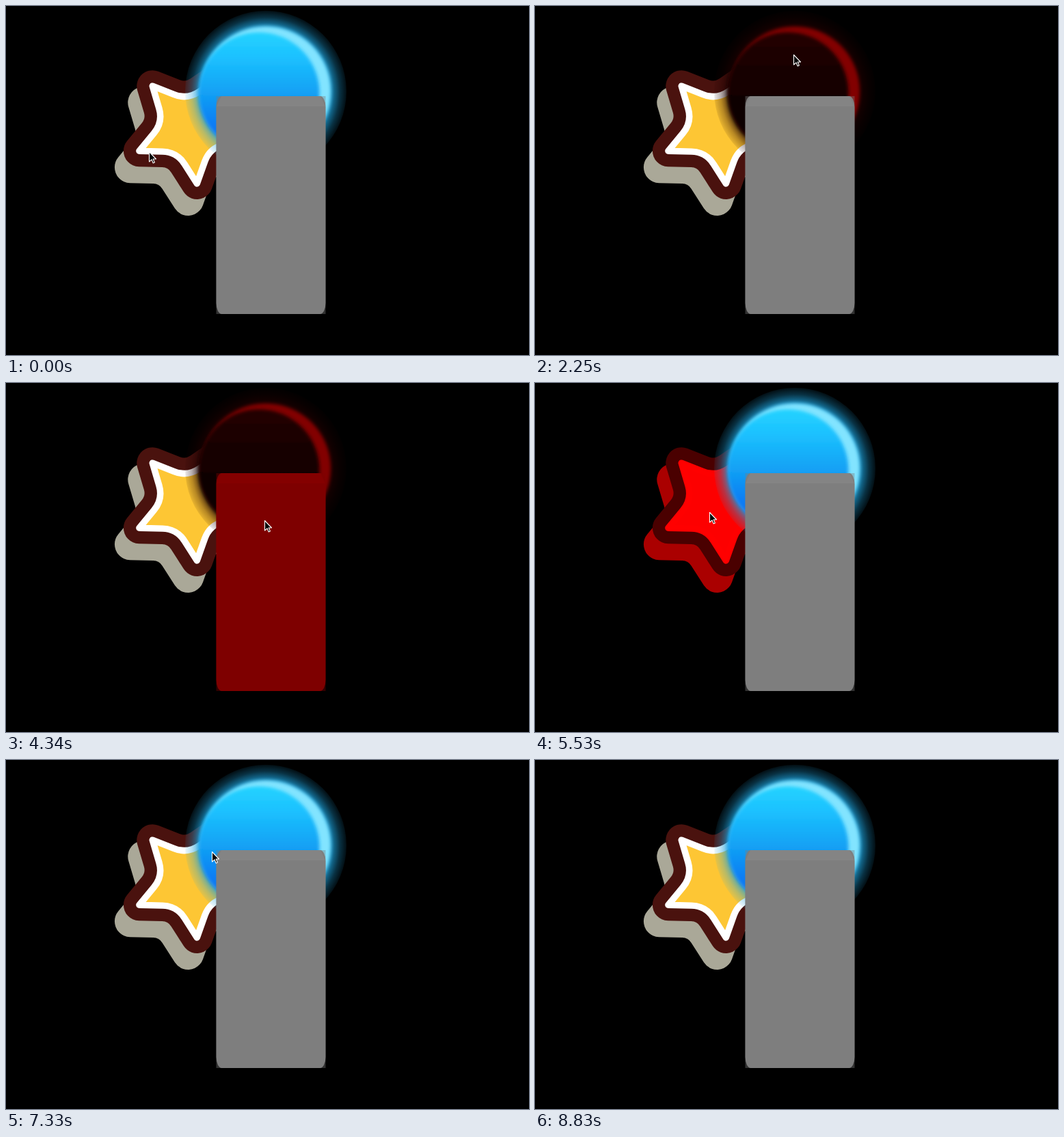
These frames come from a looping animation (765x511 px, 9550 ms). An HTML page:

```html
<!DOCTYPE html>
<html lang="en">
<head>
<meta charset="utf-8">
<title>Click hit test</title>
<style>
  html, body { margin: 0; width: 100%; height: 100%; overflow: hidden; background: #000; }
  svg { display: block; width: 100%; height: 100%; }
</style>
</head>
<body>
<svg viewBox="0 0 765 511">
  <defs>
    <!-- Multiplies a shape by pure red -->
    <filter id="redTint" x="-30%" y="-30%" width="160%" height="160%" color-interpolation-filters="sRGB">
      <feColorMatrix values="1 0 0 0 0  0 0 0 0 0  0 0 0 0 0  0 0 0 1 0"/>
    </filter>
    <filter id="soft"><feGaussianBlur stdDeviation="2.4"/></filter>
    <radialGradient id="glow">
      <stop offset=".78" stop-color="#1c9fd8"/>
      <stop offset=".85" stop-color="#1c9fd8" stop-opacity=".62"/>
      <stop offset=".92" stop-color="#1c9fd8" stop-opacity=".31"/>
      <stop offset="1" stop-color="#1c9fd8" stop-opacity=".09"/>
    </radialGradient>
    <linearGradient id="sky" x1="0" y1="36" x2="0" y2="220" gradientUnits="userSpaceOnUse">
      <stop offset="0" stop-color="#26d4ff"/>
      <stop offset=".2" stop-color="#1cc2ff"/>
      <stop offset=".5" stop-color="#12a0f4"/>
      <stop offset=".75" stop-color="#0a7cf4"/>
      <stop offset="1" stop-color="#0864e8"/>
    </linearGradient>
    <path id="starShape" stroke-linejoin="round"/>
  </defs>
  <rect width="765" height="511"/>

  <g id="star">
    <use href="#starShape" x="-13" y="24" fill="#aaa898" stroke="#aaa898" stroke-width="46"/>
    <use href="#starShape" fill="#4a120e" stroke="#4a120e" stroke-width="46"/>
    <use href="#starShape" fill="#fdc634" stroke="#fff" stroke-width="9.5"/>
  </g>

  <g id="ball">
    <circle cx="380" cy="125" r="118" fill="url(#glow)"/>
    <circle cx="380" cy="125" r="95" fill="#82e4ff" filter="url(#soft)"/>
    <circle cx="370" cy="127" r="88.5" fill="url(#sky)" filter="url(#soft)"/>
  </g>

  <g id="block" fill="#7e7e7e">
    <rect x="307.5" y="132" width="160" height="319" opacity=".4"/>
    <rect x="307.5" y="132" width="160" height="319" rx="8" ry="16"/>
    <path d="M315 132H460L467 147H308Z" fill="#848484"/>
  </g>

  <path id="cursor" d="M.5 .5V15L4 11.8 6.2 17 8.4 16 6.2 11H10.5Z"
        stroke="#fff" stroke-width="1.1" stroke-linejoin="round"/>
</svg>

<script>
const LOOP = 9550, CURSOR_GONE = 8830;
const byId = id => document.getElementById(id);
const parts = ['star', 'ball', 'block'];

// Each stop: when the cursor sets out (releasing the button), when it presses,
// where it goes, what the click hits and how many of four steps the way takes.
const stops = [
  { leave: 0,    press: Infinity, x: 209, y: 213, hits: [] },
  { leave: 450,  press: 1050, x: 240, y: 190, hits: ['star'] },
  { leave: 1650, press: 2250, x: 378, y: 71,  hits: ['ball'] },
  { leave: 2700, press: 3300, x: 378, y: 267, hits: ['block'], travel: 2 },
  { leave: 3750, press: 4340, x: 378, y: 201, hits: ['ball', 'block'] },
  { leave: 4940, press: 5530, x: 255, y: 189, hits: ['star'] },
  { leave: 6130, press: 6730, x: 301, y: 134, hits: ['star', 'ball'] },
  { leave: 7330, press: 7930, x: 316, y: 150, hits: parts },
  { leave: 8680, press: Infinity, x: 316, y: 150, hits: [] },
];

function starPath(cx, cy, tipRadius, innerRadius) {
  const polar = (radius, degrees) => {
    const a = degrees * Math.PI / 180;
    return [cx + radius * Math.cos(a), cy + radius * Math.sin(a)];
  };
  const toward = (p, q) => p.map((v, i) => v + (q[i] - v) * 0.62);
  let d = '';
  for (let i = 0; i < 5; i++) {
    const angle = 83.5 + 72 * i;
    const tip = polar(tipRadius, angle);
    const inner = polar(innerRadius, angle + 36);
    const next = polar(tipRadius, angle + 72);
    d += `${i ? 'L' : 'M'}${tip}L${toward(tip, inner)}Q${inner} ${toward(next, inner)}`;
  }
  return d + 'Z';
}

function draw(t) {
  const index = stops.findLastIndex(s => s.leave <= t);
  const stop = stops[index], from = stops[Math.max(0, index - 1)];
  const step = Math.floor((t - stop.leave) / ((stop.press - stop.leave) / 4) + 1e-6);
  const p = Math.min(1, step / (stop.travel || 3));
  const ease = index ? p * p * (3 - 2 * p) : 1;
  const x = from.x + (stop.x - from.x) * ease;
  const y = from.y + (stop.y - from.y) * ease;
  byId('cursor').setAttribute('transform', `translate(${x} ${y})`);
  byId('cursor').style.display = t < CURSOR_GONE ? '' : 'none';
  for (const id of parts) {
    const hit = t >= stop.press && stop.hits.includes(id);
    byId(id).style.filter = hit ? 'url(#redTint)' : '';
  }
}

byId('starShape').setAttribute('d', starPath(270, 178, 82.5, 41));
const begin = performance.now();
function tick() {
  draw((performance.now() - begin) % LOOP);
  requestAnimationFrame(tick);
}
tick();
</script>
</body>
</html>
```
